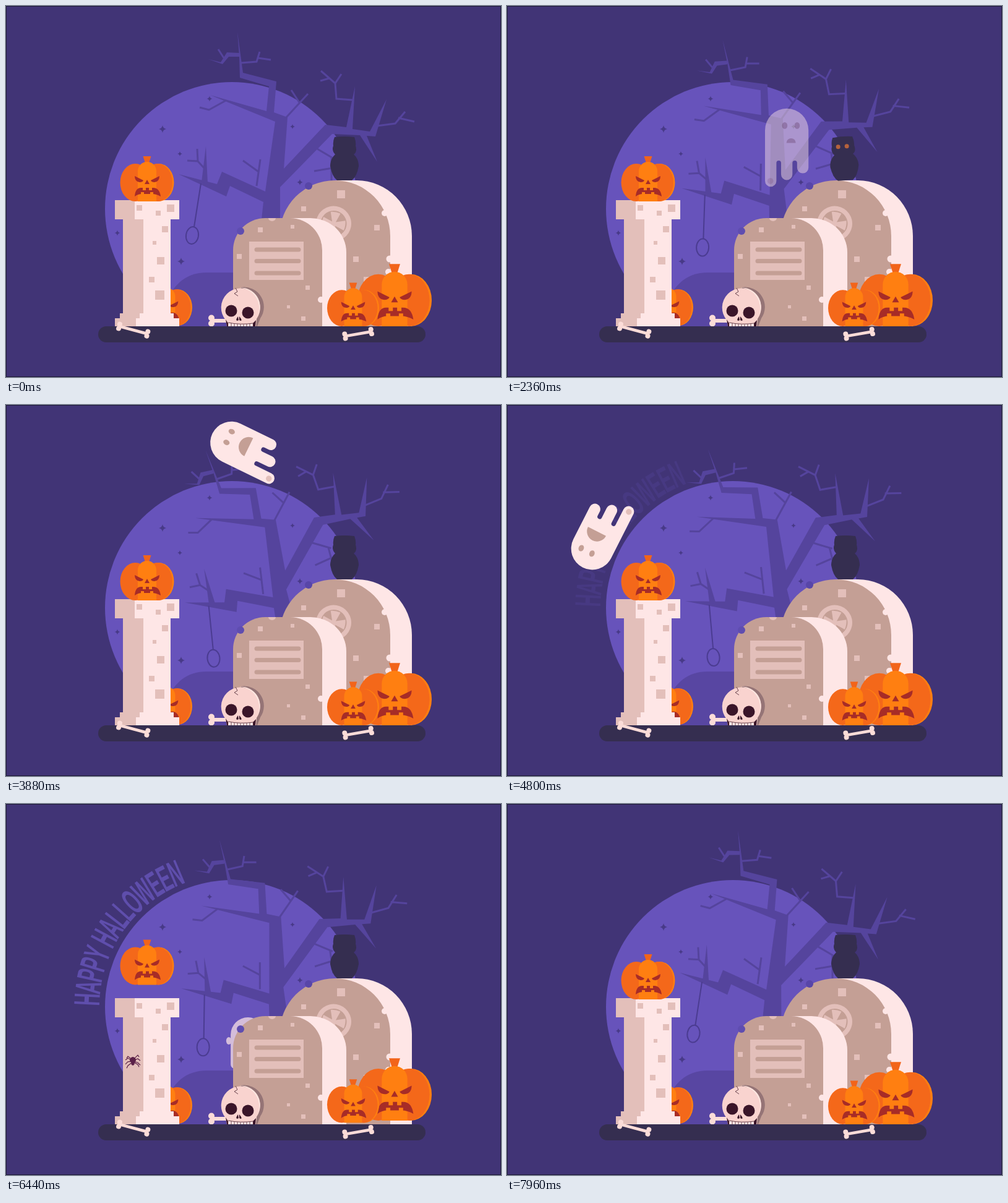
Animation, 800 px wide and 600 px high, one loop 8 s. Source, as an HTML page:

```html
<!DOCTYPE html>
<html lang="en">
<head>
<meta charset="utf-8">
<title>Graveyard night</title>
<style>
html, body { margin: 0; height: 100%; overflow: hidden; background: #413476 }
svg { display: block; width: 100vw; height: 100vh }
.line { fill: none; stroke: #55449d; stroke-width: 3 }
.light { fill: #fee6e6 }
.shade { fill: #e3bfba }
.stone { fill: #c49f95 }
.dark { fill: #352e50 }
#title { font: 700 59px "Liberation Sans", Arial, sans-serif; fill: #5f4eac; text-anchor: middle }
</style>
</head>
<body>
<svg viewBox="0 0 800 600">
  <defs>
    <g id="pumpkin">
      <path d="M-6.5-73H6.5L3-62H-3Z" fill="#f2641a"/>
      <ellipse cx="19" cy="-30.5" rx="24.5" ry="30.5" fill="#ff7f11"/>
      <ellipse cx="17" cy="-30.5" rx="24" ry="30.5" fill="#f4681a"/>
      <ellipse cx="-19" cy="-30.5" rx="24.5" ry="30.5" fill="#f4681a"/>
      <path d="M-15 0V-49A15 15 0 0 1 15-49V0Z" fill="#ff7f11"/>
      <g fill="#a72c27">
        <path id="eye" d="M-20-41L-6-34Q-7-31-12-31Q-20-32-20-41Z"/>
        <use href="#eye" transform="scale(-1 1)"/>
        <path d="M0-35L4-28H-4Z"/>
        <path d="M-20-8Q-19-22-10-22H10Q20-22 22-8Q15-12 8-12H-8Q-15-12-20-8Z"/>
      </g>
      <path d="M-7-23H-2V-18H-7ZM3-23H8V-18H3ZM-10-15H-5V-11H-10ZM5-15H10V-11H5Z" fill="#ff7f11"/>
    </g>
    <clipPath id="shaft"><path d="M170 345H290V518H170Z"/></clipPath>
  </defs>

  <rect width="800" height="600" fill="#413476"/>
  <circle cx="365" cy="328" r="205" fill="#6753bb"/>
  <g id="stars" fill="#483a88"></g>
  <path d="M250 518Q262 431 325 431H380V518Z" fill="#5846a2"/>

  <g id="tree" fill="#55449d">
    <path d="M405 400L413 345L416 317L362 291L356 308L279 272L341 288L349 268L419 300L435 187L330 144L421 170L425 130L378 116L377 82L374 42L383 108L437 122L433 172L455 180L449 263L516 192L550 196L564 130L560 199L588 203L615 151L597 211L583 210L600 252L572 209L527 207L443 293L443 345V400Z"/>
    <path d="M327 86L347 91L357 75L377 76V82H360L350 94ZM316 285L323 227L326 287Z"/>
    <path class="line" d="M343 70L352 84M380 92L405 90L410 74M407 84L428 87M461 136L474 156M488 142L453 180M313 164L328 168L355 153M509 105L532 125L542 110M508 121L522 117M532 125L534 150L560 152M599 194L629 190L645 171M634 181L660 187"/>
    <path class="line" stroke-width="2.5" d="M293 250L310 251L320 262M309 231L310 251M383 250L408 268M411 248L405 291M503 231L530 247M498 267L528 262M526 245L526 282"/>
    <g fill="none" stroke="#4b3c91" stroke-width="2">
      <path d="M315 287L304 357"/>
      <ellipse cx="301" cy="371" rx="10" ry="14" transform="rotate(9 301 371)"/>
    </g>
  </g>

  <g id="title"></g>

  <g id="ghost">
    <path class="light" d="M-32.5 0A32.5 32.5 0 0 1 32.5 0V56A8.5 8.5 0 0 1 15.5 56V49A3.5 3.5 0 0 0 8.5 49V66A8.5 8.5 0 0 1-8.5 66V49A3.5 3.5 0 0 0-15.5 49V76A8.5 8.5 0 0 1-32.5 76Z"/>
    <circle cx="-24.5" cy="76" r="4.5" class="shade"/>
    <g class="stone">
      <ellipse cx="-3" cy="-7" rx="4" ry="5"/>
      <ellipse cx="15.5" cy="-7" rx="4" ry="5"/>
      <path id="mouth"/>
    </g>
    <ellipse id="hand" class="light" cx="36" cy="11.6" rx="5" ry="7"/>
  </g>

  <use href="#pumpkin" transform="translate(259 517) scale(.965)"/>

  <!-- pillar -->
  <path class="light" d="M189 340H266V497H271V505H280V518H176V505H184V497H189Z"/>
  <path class="shade" d="M189 340H222V497H216V505H210V518H176V505H184V497H189Z"/>
  <g clip-path="url(#shaft)"><g id="spider" fill="#5b2148" stroke="#5b2148"></g></g>
  <path class="light" d="M176 314H280V345H176Z"/>
  <path class="shade" d="M176 314H208V345H176Z"/>

  <!-- large stone -->
  <path class="light" d="M531 282H567A89.5 90 0 0 1 656 372V518H531Z"/>
  <path class="stone" d="M442 518V372A89.5 90 0 0 1 621 372V518Z"/>
  <circle cx="489" cy="291" r="6" fill="#5846a8"/>
  <g class="light"><circle cx="612" cy="335" r="5"/><circle cx="620" cy="409" r="5.5"/><circle cx="618" cy="430" r="5"/></g>
  <g transform="translate(529.500 352) rotate(10)">
    <circle r="28.500" class="shade"/><circle r="21" class="stone"/>
    <path class="shade" d="M-8-18Q0-20 8-18L3-3L18-8Q20 0 18 8L3 3L8 18Q0 20-8 18L-3 3L-18 8Q-20 0-18-8L-3-3Z"/>
  </g>

  <g id="owl" class="dark">
    <path d="M531 212Q547 210 563 212Q566 220 565 226Q568 236 562 240Q570 247 570 259Q567 276 559 282H535Q527 276 524 259Q524 247 532 240Q526 234 529 226Q528 219 531 212Z"/>
    <g id="eyes" fill="#b5623c"><circle cx="539" cy="227" r="3.5"/><circle cx="553" cy="227" r="3.5"/></g>
  </g>

  <!-- small stone -->
  <path class="light" d="M440 343H492A58 55 0 0 1 550 398V518H440Z"/>
  <path class="stone" d="M367 518V395A52 52 0 0 1 419 343H459A52 52 0 0 1 511 395V518Z"/>
  <path class="shade" d="M393 381H481V443H393ZM424 343A6 5 0 0 0 436 343Z"/>
  <path d="M405 394H473M405 412.500H473M405 432H473" stroke="#c49f95" stroke-width="7" stroke-linecap="round"/>
  <circle cx="379" cy="364" r="6" fill="#5f4db0"/>
  <circle cx="509" cy="475" r="5" class="light"/>
  <g id="chips" class="shade"></g>

  <!-- skull -->
  <path fill="#957476" d="M380 455A32 32 0 0 1 411 505L406 518H375Z"/>
  <g id="skullBone"></g>
  <path fill="#f9d3cf" d="M357 518L355 508A31.500 31.500 0 1 1 405 506L404 518Z"/>
  <path fill="#fde5df" d="M378 455.500A31 31 0 0 1 407 501A34 34 0 0 0 378 455.500Z"/>
  <g fill="#3a1529">
    <circle cx="364" cy="493" r="9.500"/><circle cx="391" cy="496" r="9.500"/>
    <path d="M375 502Q370 509 374 509L376 508ZM377 502Q383 509 379 509L377 508ZM355 507L359 513V518H357ZM404 508L399 513V518H403Z"/>
  </g>
  <path d="M360 512Q379 516 399 513V518H360Z" class="light"/>
  <path d="M359 512Q379 516 400 513M364 513V518M369 514V518M374 514V518M379 515V518M384 515V518M389 514V518M394 514V518M371 456L374 462L369 465L375 469" fill="none" stroke="#6c4650"/>

  <use id="big" href="#pumpkin"/>
  <use id="small" href="#pumpkin"/>
  <use id="top" href="#pumpkin"/>

  <rect x="149" y="518" width="529" height="26" rx="13" class="dark"/>
  <g id="bones"></g>
  <rect x=".5" y=".5" width="799" height="599" fill="none" stroke="#1d1838"/>
</svg>

<script>
const $ = id => document.getElementById(id);
const set = (id, name, value) => $(id).setAttribute(name, value);
const clamp = v => Math.max(0, Math.min(1, v));

// Static details
$('stars').innerHTML = [[253,199,6],[329,150,4.5],[281,239,4],[463,195,4],[475,285,5],[180,367,4.5],[283,413,6]]
  .map(([x, y, r]) => `<path transform="translate(${x} ${y}) scale(${r})" d="M0-1Q.15-.15 1 0Q.15.15 0 1Q-.15.15-1 0Q-.15-.15 0-1Z"/>`).join('');

$('chips').innerHTML = [
  [260,321,12],[211,322,9],[242,331,8],[252,356,10],[237,380,6],[244,406,12],[231,438,9],[241,460,15],
  [535,298,13],[477,324,8],[595,354,9],[561,405,9],[578,438,8],
  [407,358,8],[460,354,6],[373,401,8],[484,452,7],[454,484,5],[477,502,7]
].map(([x, y, s]) => `<path d="M${x} ${y}h${s}v${s}h${-s}Z"/>`).join('');

function bone(x, y, length, angle, size = 4) {
  const knobs = [0, length].map(k => [-1, 1].map(s =>
    `<circle cx="${k}" cy="${s * size * .9}" r="${size}"/>`).join('')).join('');
  return `<g transform="translate(${x} ${y}) rotate(${angle})" fill="#fbdcd8">${knobs}` +
    `<path d="M0 0H${length}" stroke="#fbdcd8" stroke-width="${size * 1.2}"/></g>`;
}
$('bones').innerHTML = bone(183, 518, 47, 15) + bone(548, 534, 43, -10);
$('skullBone').innerHTML = bone(332, 509, 40, 0, 5);

function writeTitle() {
  const squeeze = .472, pen = document.createElement('canvas').getContext('2d');
  pen.font = getComputedStyle($('title')).font;
  let along = 0;
  for (const letter of 'HAPPY HALLOWEEN') {
    const width = pen.measureText(letter).width * squeeze;
    const angle = -89.5 + (along + width / 2) / 235 * 180 / Math.PI;
    $('title').innerHTML += `<text transform="translate(365 328) rotate(${angle}) translate(0 -214) scale(${squeeze} 1)">${letter}</text>`;
    along += width;
  }
}
writeTitle();

// Smooth interpolation through rows of [time, ...values]
function track(keys, t) {
  const last = keys.length - 1;
  const i = Math.max(0, keys.findIndex(k => k[0] > t) - 1);
  const slope = (j, c) => {
    const a = keys[Math.max(0, j - 1)], b = keys[Math.min(last, j + 1)];
    return (b[c] - a[c]) / (b[0] - a[0]);
  };
  const a = keys[i], b = keys[i + 1], d = b[0] - a[0], u = (t - a[0]) / d, v = 1 - u;
  return a.slice(1).map((_, n) => {
    const c = n + 1;
    return a[c] * v * v * (1 + 2 * u) + b[c] * u * u * (3 - 2 * u)
      + d * u * v * (slope(i, c) * v - slope(i + 1, c) * u);
  });
}
const pulse = (t, a, b, c, d) => clamp((t - a) / (b - a)) * clamp((d - t) / (d - c));

// time, x, y, turn, scale, opacity
const rise = [
  [350,228,430,0,1,1],[860,310,368,0,1,1],[1360,320.5,263.5,0,1,.89],
  [2360,452,201,0,1.08,.45],[2720,486,190,0,1.1,0]];
const fly = [
  [2750,560,330,-15,1.04,1],[3300,505,150,-45,1.04,1],[3880,364.5,61,-64,1.05,1],
  [4220,286,72,-97,1.05,1],[4800,138,232,-153,1.05,1],[5060,116,320,-180,1.05,1],[5600,228,450,-190,1,1]];
const peek = [
  [5950,440,373,0,.86,.72],[6400,393,373,0,.86,.72],[6850,393,373,0,.86,.72],[7350,440,373,0,.86,.72]];

function drawGhost(t) {
  const path = [rise, fly, peek].find(k => t >= k[0][0] && t < k[k.length - 1][0]);
  if (!path) return set('ghost', 'opacity', 0);
  const [x, y, turn, scale, opacity] = track(path, t);
  const peeking = path === peek;
  set('ghost', 'transform', `translate(${x} ${y}) rotate(${turn}) scale(${peeking ? -scale : scale} ${scale})`);
  set('ghost', 'opacity', clamp(opacity));
  set('hand', 'opacity', peeking ? 1 : 0);
  set('mouth', 'd', path === fly ? 'M-10 27A15.5 15.5 0 0 1 21 27Z' : 'M-.5 19A7 7 0 0 1 13.5 19Z');
}

function hop(id, x, y, scale, height, t) {
  const air = clamp((t - 250) / 650);
  const lift = 4 * air * (1 - air) * height;
  const squash = .1 * (Math.sin(Math.PI * clamp(t / 250)) + Math.sin(Math.PI * clamp((t - 900) / 220)));
  set(id, 'transform', `translate(${x} ${y - lift}) scale(${scale * (1 + squash)} ${scale * (1 - squash)})`);
}

function drawSpider(t) {
  set('spider', 'transform', `translate(205 ${415 + (t - 6440) * .1})`);
  set('spider', 'opacity', t > 5500 && t < 7700 ? 1 : 0);
  let legs = '';
  for (const side of [-1, 1]) for (let n = 0; n < 4; n++) {
    const swing = Math.sin(t / 50 + n * 2 + side) * 1.2;
    const y = n * 5 - 8 + swing;
    legs += `M0 ${n - 1}L${side * 8} ${y}L${side * (n % 3 ? 12 : 10)} ${y + (n < 2 ? 3 : 4)}`;
  }
  $('spider').innerHTML = `<circle cy="-1" r="4.5"/><circle cy="5" r="2.2"/><path d="${legs}" fill="none" stroke-width="1.2"/>`;
}

function draw(now) {
  const t = now % 8000;
  const swing = Math.pow(t % 4000 / 4000, 1.5);
  set('tree', 'transform', `rotate(${-15.4 * (t < 4000 ? swing : 1 - swing)} 468 257)`);
  set('title', 'opacity', pulse(t, 4600, 5500, 6900, 7500));
  drawGhost(t);
  drawSpider(t);

  const look = pulse(t, 2000, 2200, 2800, 3000);
  set('owl', 'transform', `rotate(${-4 * look} 547 282)`);
  set('eyes', 'opacity', look);

  hop('top', 228, 316, 1, 27, t - 5750);
  hop('big', 628, 518, 1.38, 18, t - 5600);
  hop('small', 561, 518, .965, 14, t - 5570);
  requestAnimationFrame(draw);
}
requestAnimationFrame(draw);
</script>
</body>
</html>
```
